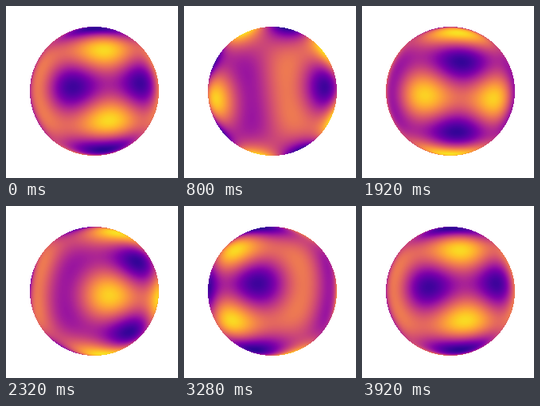
A matplotlib script that plays this animation: 216x216 px, repeating every 4000 ms.

```python
import numpy as np
import matplotlib.pyplot as plt
from matplotlib.animation import FuncAnimation

SIZE = 216
FRAMES, INTERVAL = 50, 80
CENTER, RADIUS = (111, 107), 81
TILT, NODE = np.radians(6.8), np.radians(38)  # lean of the pattern's pole
LON = np.radians(13)  # starting longitude of the pattern's main axis


def direction(lon, lat):
    return np.array([np.cos(lat) * np.cos(lon), np.cos(lat) * np.sin(lon), np.sin(lat)])


def pattern_axes():
    """Orthonormal axes of the pattern, leaning against the spin axis."""
    pole = direction(NODE + np.pi, np.pi / 2 - TILT)
    main = direction(LON, np.arctan(np.tan(TILT) * np.cos(LON - NODE)))
    return np.array([main, np.cross(pole, main), pole])


def harmonic(x, y, z):
    """Degree-5 surface harmonic about x, with orders 0, 2 and 4."""
    zonal = (63 * x**5 - 70 * x**3 + 15 * x) / 8
    order2 = (z**2 - y**2) * (3 * x**3 - x)
    order4 = (y**4 - 6 * y**2 * z**2 + z**4) * x
    return -0.25 * zonal + 3.02 * order2 - 0.8 * order4


# Orthographic view: x towards the viewer, y right, z up
rows, cols = np.mgrid[0:SIZE, 0:SIZE] + 0.5
right = (cols - CENTER[0]) / RADIUS
up = (CENTER[1] - rows) / RADIUS
inside = right**2 + up**2 <= 1
depth = np.sqrt(np.clip(1 - right**2 - up**2, 0, None))
points = np.array([depth[inside], right[inside], up[inside]])
axes = pattern_axes()


def field(i):
    turn = 2 * np.pi * i / (FRAMES - 1)
    c, s = np.cos(turn), np.sin(turn)
    unspin = np.array([[c, s, 0], [-s, c, 0], [0, 0, 1]])
    values = np.ma.masked_all((SIZE, SIZE))
    values[inside] = harmonic(*(axes @ unspin @ points))
    return values


fig = plt.figure(figsize=(SIZE / 100, SIZE / 100), dpi=100, facecolor="white")
ax = fig.add_axes([0, 0, 1, 1])
ax.axis("off")
globe = ax.imshow(field(0), cmap="plasma", vmin=-1, vmax=1,
                  interpolation="nearest", aspect="auto")


def update(i):
    globe.set_data(field(i))
    return [globe]


anim = FuncAnimation(fig, update, frames=FRAMES, interval=INTERVAL,
                     repeat=True, repeat_delay=0)
plt.show()
```
